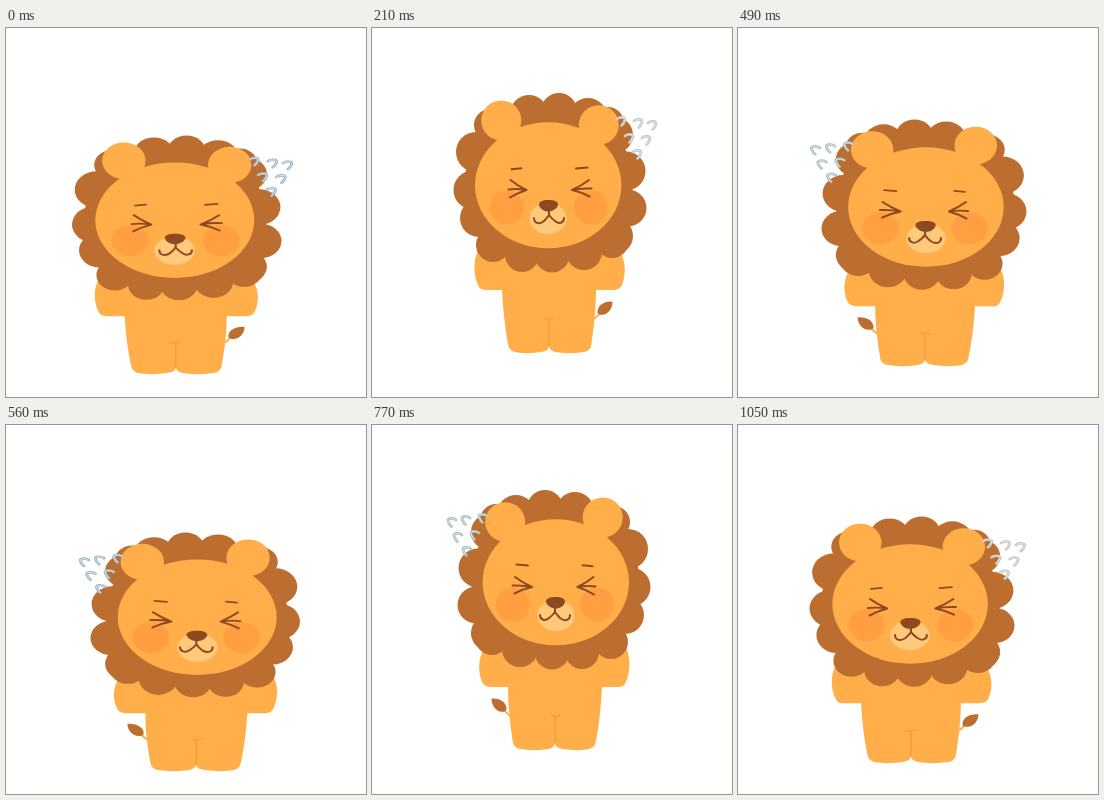
Recreate the animation shown at these times as an HTML page with a canvas. Size 360 px wide and 369 px high, loop 1.12 s.

```html
<!DOCTYPE html>
<html lang="en">
<head>
<meta charset="utf-8">
<title>Hopping lion</title>
<style>
html, body { margin: 0; width: 100%; height: 100%; overflow: hidden; background: #fff; }
canvas { display: block; width: 360px; height: 369px; }
</style>
</head>
<body>
<canvas id="stage" width="360" height="369"></canvas>
<script>
const ctx = document.getElementById('stage').getContext('2d');
const STEP = 70, STEPS = 16, HALF = 8;
const ORANGE = '#ffae49', MANE = '#bc6d30', DARK = '#8d4a20';
const CHEEK = '#ff9f42', MUZZLE = '#ffc97c', SEAM = '#f79c3d';

// Lion bounds [left, right, top, bottom] by steps away from the ground
const REST = [81.5, 274.5, 65.5, 325];
const POSES = [
  [66, 275.5, 108, 346],
  [71.5, 276.5, 92, 338],
  [76.5, 275.5, 78.5, 331.5],
  REST,
  [86, 273.5, 55, 319.5]
];

// Mane curls: x, y, radius
const CURLS = [
  [157, 86, 19], [187, 83, 18], [216, 89, 19], [236, 95, 16],
  [243, 107, 18], [254, 143, 19.5], [256, 180, 18.5], [243, 208, 18],
  [240, 213, 17], [212, 224, 18], [180, 227, 17.5], [150, 227, 17],
  [121, 217, 17], [107, 190, 19], [101, 162, 19.5], [104, 124, 20],
  [118, 97, 16]
];
const MARKS = [[249, 93], [266, 95], [280, 97], [257, 110], [274, 112], [265, 126]];

const TORSO = new Path2D(
  'M112 215 C101 223 100 246 107 259 Q109 262 114 262 L130 262 ' +
  'C131 281 133 300 136 316 Q137 324 146 324.5 Q157 326 169 324 Q177 323 177 318 ' +
  'Q178 324 187 324.5 Q201 326 212 324 Q219 323 219.5 315 ' +
  'C222 298 224 281 224 262 L240 262 Q248 262 250 257 C255 244 254 228 242 215 Z');
const TUFT = new Path2D('M225.5 285 C225 278 231 273 240.5 273.5 C240.5 281 235 288.5 227.5 286.5 Z');
const NOSE = new Path2D('M176.5 172 C183 172 186.5 174 186 177 C185 181 180 183.5 176.5 183.5 ' +
  'C172 183.5 168 181 167 177 C166.5 174 170 172 176.5 172 Z');
const MOUTH = new Path2D('M162 190 C162 196 168 196.5 172 193 Q175 190 177 187 ' +
  'Q180 191 183 193 C187 196.5 192 195 192 190 M177 182 L177 187');
const BROWS = new Path2D('M139.5 141.3 L149.5 140.3 M204 140.5 L215.5 139.5');
const EYES = new Path2D(
  'M138.5 152 Q146 158 154.5 162 Q146 160.5 136.5 161.5 M154.5 162 Q145 165 138 169.5 ' +
  'M217 152 Q209 158 200 162 Q209 160 219.5 160.5 M200 162 Q209 164 217.5 168.5');
const HOOK = new Path2D('M-4 -2 Q-2 -4 2 -3.5 Q5 -3 3.5 0 Q2.5 3 0.5 4.5');

function oval(x, y, rx, ry, color) {
  ctx.fillStyle = color;
  ctx.beginPath();
  ctx.ellipse(x, y, rx, ry, 0, 0, Math.PI * 2);
  ctx.fill();
}

function fill(path, color) {
  ctx.fillStyle = color;
  ctx.fill(path);
}

function line(path, color, width) {
  ctx.strokeStyle = color;
  ctx.lineWidth = width;
  ctx.stroke(path);
}

function drawLion() {
  line(new Path2D('M220 292 Q224 290 228 285'), ORANGE, 2);
  fill(TUFT, MANE);
  fill(TORSO, ORANGE);
  line(new Path2D('M172 290.5 Q177 292 181 290 M177 291 L177 318'), SEAM, 1.4);

  oval(177, 153, 84, 76, MANE);
  for (const [x, y, r] of CURLS) oval(x, y, r, r, MANE);

  oval(129.3, 92.5, 20, 20, ORANGE);
  oval(226.8, 97, 20, 19.7, ORANGE);
  oval(176.2, 157.3, 73.2, 63, ORANGE);
  oval(135, 179.5, 17, 17, CHEEK);
  oval(219, 179.5, 17, 17, CHEEK);
  oval(176, 190.5, 18.5, 15.5, MUZZLE);

  line(BROWS, DARK, 1.9);
  line(EYES, DARK, 2);
  fill(NOSE, DARK);
  line(MOUTH, DARK, 2);
}

function drawMarks(color) {
  for (const [x, y] of MARKS) {
    ctx.save();
    ctx.translate(x, y);
    line(HOOK, color, 2.8);
    line(HOOK, '#e9eeee', 0.8);
    ctx.restore();
  }
}

function draw(now) {
  const step = Math.floor(now / STEP) % STEPS;
  const phase = step % HALF;
  const [l, r, t, b] = POSES[Math.min(phase, HALF - phase)];
  const left = step > 4 && step <= 12;
  const landing = step % HALF <= 1;
  const markColor = landing ? '#9bb7c5' : left ? '#a9bcbc' : '#c3c5c6';

  ctx.setTransform(1, 0, 0, 1, 0, 0);
  ctx.fillStyle = '#fff';
  ctx.fillRect(0, 0, 360, 369);
  ctx.lineCap = ctx.lineJoin = 'round';
  if (left) {
    ctx.translate(360, 0);
    ctx.scale(-1, 1);
  }
  ctx.translate(l, t);
  ctx.scale((r - l) / (REST[1] - REST[0]), (b - t) / (REST[3] - REST[2]));
  ctx.translate(-REST[0], -REST[2]);
  drawLion();
  drawMarks(markColor);
}

const start = performance.now();
function tick() {
  draw(performance.now() - start);
  requestAnimationFrame(tick);
}
tick();
</script>
</body>
</html>
```
